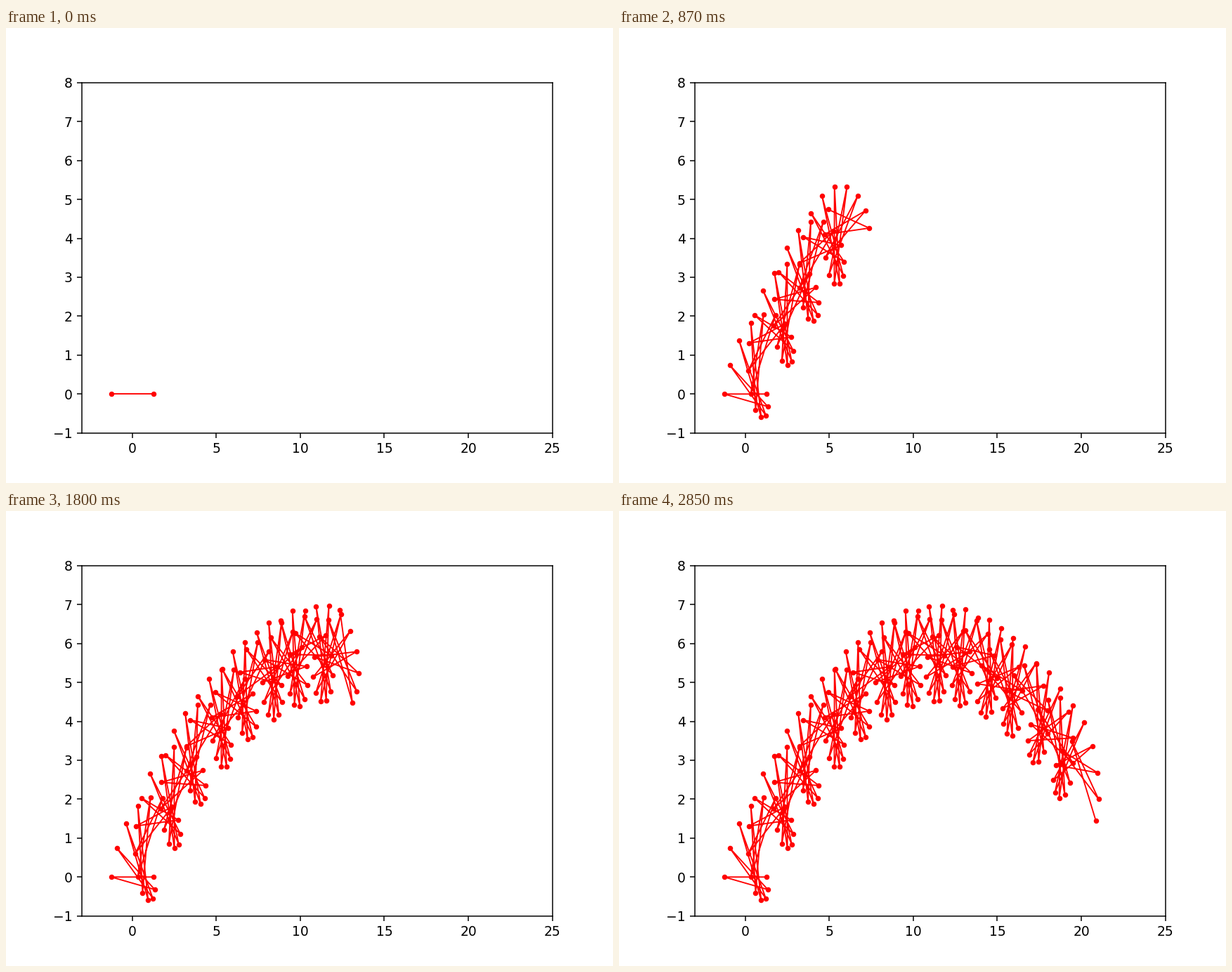
A matplotlib script for the animation above (3.04 s loop, 864 by 648 pixels).

```python
import numpy as np
import matplotlib.pyplot as plt
from matplotlib.animation import FuncAnimation

LENGTH = 2.5        # rod length
SPEED = 15.0        # launch speed at 45 degrees
GRAVITY = 9.8
SPIN = 22.0         # rad/s, clockwise
DT = 0.02
STEPS = 96

TICK = 10           # ms per animation frame
STEP_MS = 30        # ms per simulation step
LOOP_MS = 3040


def rod_ends():
    """Both ends of the thrown rod at every step, as one long path."""
    t = np.arange(STEPS) * DT
    v = SPEED / np.sqrt(2)
    centre = np.column_stack([v * t, v * t - GRAVITY * t**2 / 2])
    half = LENGTH / 2 * np.column_stack([np.cos(SPIN * t), -np.sin(SPIN * t)])
    return np.stack([centre + half, centre - half], axis=1).reshape(-1, 2)


path = rod_ends()

fig, ax = plt.subplots(figsize=(6.4, 4.8), dpi=135)
ax.set_xlim(-3, 25)
ax.set_ylim(-1, 8)
trail, = ax.plot([], [], "r.-", lw=1, ms=6)


def update(i):
    step = min(i * TICK // STEP_MS, STEPS - 1)
    trail.set_data(*path[:2 * (step + 1)].T)
    return trail,


anim = FuncAnimation(fig, update, frames=LOOP_MS // TICK, interval=TICK,
                     repeat=True, repeat_delay=0)
plt.show()
```
